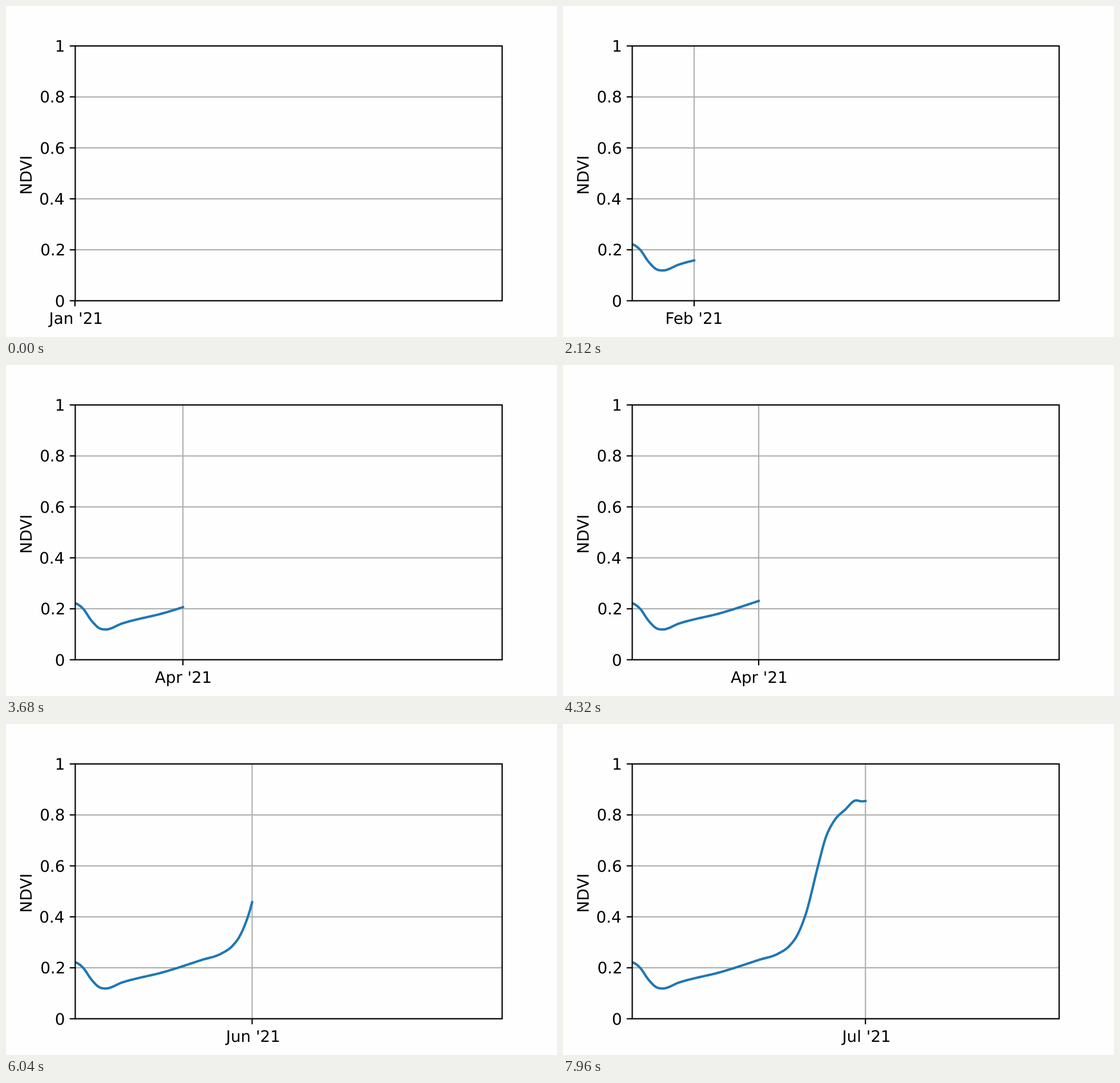
An HTML page with a canvas that plays this animation: 966x580 px, repeating every 8 s.

```html
<!DOCTYPE html>
<html lang="en">
<head>
<meta charset="utf-8">
<title>NDVI over the year</title>
<style>
  html, body { margin: 0; width: 100%; height: 100%; overflow: hidden; background: #fefefe; }
  canvas { display: block; }
</style>
</head>
<body>
<canvas id="chart" width="966" height="580"></canvas>
<script>
const ctx = document.getElementById('chart').getContext('2d');
const LOOP = 8000, MS_PER_DAY = 40;
const LEFT = 121.4, RIGHT = 869.8, TOP = 70, BOTTOM = 516.5;
const THIN = 2.2, THICK = 4.2, TICK = 9.7;
const BLACK = '#000', GRID = '#b0b0b0', BLUE = '#1f77b4';
const dayX = day => 120.9 + 2.057 * day;
const valueY = value => BOTTOM - (BOTTOM - TOP) * value;
const levels = [0, 0.2, 0.4, 0.6, 0.8, 1];

// Turning points of the season: [day, NDVI]
const keys = [
  [0, 0.222], [7, 0.2], [14, 0.154], [21, 0.1232], [26, 0.119], [40, 0.142],
  [77, 0.185], [108, 0.2307], [125, 0.2565], [134, 0.285], [141, 0.329], [148, 0.409],
  [158.6, 0.6], [165, 0.709], [172, 0.7745], [182, 0.822], [190, 0.856], [196, 0.8533], [199, 0.8545]
];

const gradient = i => (keys[i + 1][1] - keys[i][1]) / (keys[i + 1][0] - keys[i][0]);

// Slope at a key: that of the parabola through it and its neighbours
function slope(i) {
  if (i === 0) return -0.0012;
  if (i === keys.length - 1) return gradient(i - 1);
  const before = keys[i][0] - keys[i - 1][0], after = keys[i + 1][0] - keys[i][0];
  return (gradient(i - 1) * after + gradient(i) * before) / (before + after);
}

// Cubic Hermite interpolation between the keys
function ndvi(day) {
  let i = 0;
  while (i < keys.length - 2 && keys[i + 1][0] < day) i++;
  const [d0, v0] = keys[i], [d1, v1] = keys[i + 1];
  const h = d1 - d0, u = (day - d0) / h, w = 1 - u;
  return w * w * ((1 + 2 * u) * v0 + u * h * slope(i)) +
         u * u * ((1 + 2 * w) * v1 - w * h * slope(i + 1));
}

function line(x0, y0, x1, y1, color) {
  ctx.strokeStyle = color;
  ctx.lineWidth = THIN;
  ctx.beginPath();
  ctx.moveTo(x0, y0);
  ctx.lineTo(x1, y1);
  ctx.stroke();
}

// Aligns the visible ink of the text: anchor 0.5 = centre, 1 = right edge
function label(text, x, baseline, anchor) {
  const m = ctx.measureText(text);
  const inkLeft = -m.actualBoundingBoxLeft, inkRight = m.actualBoundingBoxRight;
  ctx.fillText(text, x - inkLeft - (inkRight - inkLeft) * anchor, baseline);
}

function drawCurve(lastDay) {
  if (lastDay < 1) return;
  ctx.strokeStyle = BLUE;
  ctx.lineWidth = THICK;
  ctx.lineCap = 'square';
  ctx.lineJoin = 'round';
  ctx.beginPath();
  for (let day = 0; day <= lastDay; day++) ctx.lineTo(dayX(day), valueY(ndvi(day)));
  ctx.stroke();
}

function draw(day) {
  const x = dayX(day);
  ctx.fillStyle = '#fefefe';
  ctx.fillRect(0, 0, 966, 580);
  ctx.fillStyle = BLACK;
  ctx.font = '27.78px "DejaVu Sans", sans-serif';
  ctx.textRendering = 'geometricPrecision';

  ctx.save();
  ctx.beginPath();
  ctx.rect(LEFT, TOP, RIGHT - LEFT, BOTTOM - TOP);
  ctx.clip();
  line(x, TOP, x, BOTTOM, GRID);
  for (const v of levels) line(LEFT, valueY(v), RIGHT, valueY(v), GRID);
  drawCurve(day);
  ctx.restore();

  for (const v of levels) {
    line(LEFT - TICK, valueY(v), LEFT, valueY(v), BLACK);
    label(String(v), 101.7, valueY(v) + 10, 1);
  }
  line(x, BOTTOM, x, BOTTOM + TICK, BLACK);
  const month = new Date(2021, 0, 1 + day).toLocaleString('en-US', { month: 'short' });
  label(month + " '21", x, 557, 0.5);

  ctx.strokeStyle = BLACK;
  ctx.lineWidth = THIN;
  ctx.strokeRect(LEFT, TOP, RIGHT - LEFT, BOTTOM - TOP);

  ctx.save();
  ctx.translate(44.5, 296.3);
  ctx.rotate(-Math.PI / 2);
  label('NDVI', 0, 0, 0.5);
  ctx.restore();
}

const start = performance.now();
function tick() {
  draw(Math.floor((performance.now() - start) % LOOP / MS_PER_DAY));
  requestAnimationFrame(tick);
}
tick();
</script>
</body>
</html>
```
